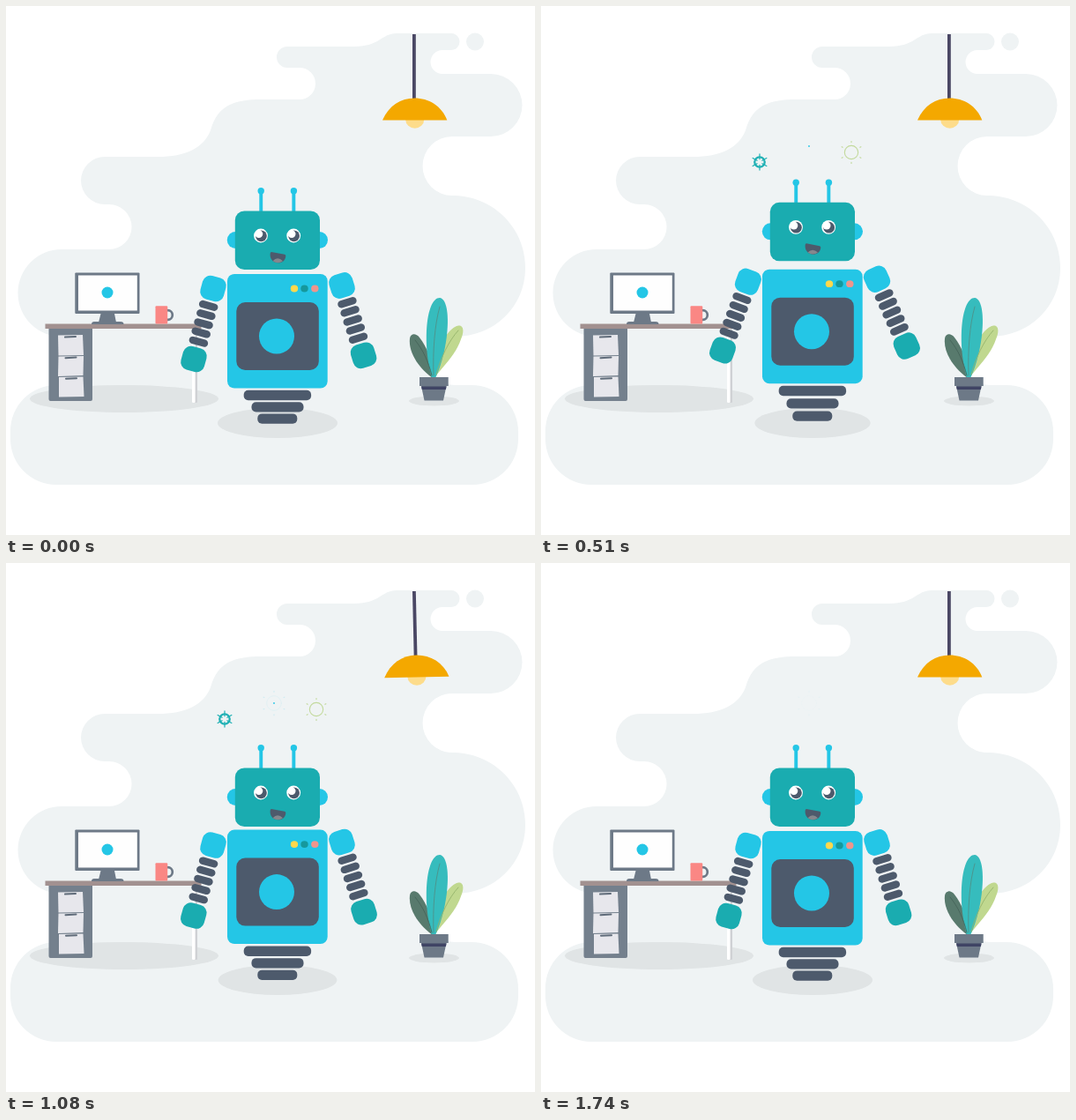
An HTML page that plays this animation: 600x600 px, repeating every 1800 ms.

```html
<!DOCTYPE html>
<html lang="en">
<head>
<meta charset="utf-8">
<title>Hopping robot</title>
<style>
html, body { margin: 0; width: 100%; height: 100%; overflow: hidden; background: #fff; }
svg { display: block; width: 100vw; height: 100vh; }
.cyan { fill: #24c6e6; }
.teal { fill: #1aacb0; }
.dark { fill: #4d5a6c; }
.steel { fill: #6d7987; }
.mist { fill: #eff3f4; }
.shade { fill: #e0e4e5; }
.line { fill: none; stroke-linecap: round; }
</style>
</head>
<body>
<svg viewBox="0 0 600 600">
  <g class="mist">
    <path d="M443 31H505A9.5 9.5 0 0 1 505 50H495A13.5 13.5 0 0 0 495 77H550A35.5 35.5 0 0 1 550 148H506
      A33.5 33.5 0 0 0 506 215C553 215 589 252 589 297C589 341 554 375 509 375A27 27 0 0 0 509 430H528
      A53 53 0 0 1 581 483V491A52 52 0 0 1 529 543H57A52 52 0 0 1 5 491V482A52 52 0 0 1 57 430H66
      A27 27 0 0 0 66 375H63A49.5 49.5 0 0 1 63 276H117A25.5 25.5 0 0 0 117 225H112A27 27 0 0 1 112 171H172
      C204 171 224 161 232 141C239 117 252 106 290 106H333A18 18 0 0 0 333 70H319A12 12 0 0 1 319 46H395
      C424 46 426 31 443 31Z"/>
    <circle cx="532" cy="40.5" r="10"/>
  </g>
  <g class="shade">
    <ellipse cx="134" cy="445.5" rx="107" ry="15.5"/>
    <ellipse cx="485.5" cy="448" rx="28.5" ry="5.5"/>
    <ellipse id="shadow" cx="308" cy="473" rx="68" ry="17"/>
  </g>

  <!-- desk -->
  <rect x="211" y="366" width="6" height="84" rx="1" fill="#cfd1d4"/>
  <rect x="211" y="366" width="3.6" height="84" rx="1" fill="#fff"/>
  <path d="M48.5 366H98V446Q98 448 96 448H50.5Q48.5 448 48.5 446Z" fill="#74808d"/>
  <g fill="#e7e7ec">
    <path d="M59 373.5L87 373L88 396L59.5 396.5Z"/>
    <path d="M59.5 397.5L88 397L87.5 419L59 420Z"/>
    <path d="M60 421L87.5 420.5L88.5 443L60 443.5Z"/>
  </g>
  <path class="line" d="M67 375.6L79 375M67.500 399.200L79.500 398.600M68 422.800L80 422.200" stroke="#5f6b79" stroke-width="2"/>
  <rect x="44.500" y="360.500" width="177" height="5.500" fill="#a29190"/>
  <g class="steel">
    <rect x="78.300" y="302.600" width="73.200" height="46.500" rx="1"/>
    <path d="M107.500 349H123L125 359H105Z"/>
    <path d="M97 361Q97 358 100 358H130Q133.500 358 133.500 361Z"/>
  </g>
  <rect x="82" y="305.500" width="66.800" height="40" fill="#fefefe"/>
  <circle class="cyan" cx="115" cy="325" r="6.500"/>
  <circle class="line" cx="183.500" cy="350.500" r="5.300" stroke="#6d7987" stroke-width="2.700"/>
  <rect x="169.500" y="340.200" width="13.700" height="20.300" rx="1" fill="#fa8784"/>

  <!-- plant -->
  <path d="M484 422C471 413 456 395 458 377C459 371 465 371 469 376C478 388 484 402 484 422Z" fill="#587a6d"/>
  <path d="M486 422C486 396 498 366 513 362.500C519 361.500 520 369 516 378C510 396 496 408 486 422Z" fill="#c0d88f"/>
  <path d="M483 422C472 385 476 331 492 331C506 333 503 388 487 422Z" fill="#36bcbd"/>
  <g class="line" stroke-width=".9">
    <path d="M483 419C479 403 473 390 464 379" stroke="#46655a"/>
    <path d="M485 419C484 392 486 362 492 341" stroke="#4f9189"/>
    <path d="M488 418C493 399 502 380 513 368" stroke="#96b46c"/>
  </g>
  <path class="steel" d="M469 421H501.700V431H499.500L496 447.500H474.500L471 431H469Z"/>
  <path d="M471 431.500H499.600L498.900 435H471.800Z" fill="#3f4464"/>

  <g id="lamp">
    <rect x="461" y="32" width="3.800" height="74" fill="#4a4764"/>
    <ellipse cx="463.700" cy="129" rx="10.500" ry="9.700" fill="#fddc8b"/>
    <path d="M427 129.500C434 113 448 104.500 463.500 104.500C479 104.500 494 113 500.300 129.500Z" fill="#f4a800"/>
  </g>

  <!-- robot -->
  <g class="dark" id="spring">
    <rect x="269.700" y="435.700" width="76.400" height="11.500" rx="5"/>
    <rect x="278.500" y="449.200" width="59" height="11.300" rx="5"/>
    <rect x="285.300" y="462.400" width="45" height="11.300" rx="5"/>
  </g>
  <g id="body">
    <rect class="cyan" x="251" y="304" width="113.700" height="129.500" rx="8"/>
    <ellipse cx="327" cy="320.500" rx="4.200" ry="3.900" fill="#ffd84c"/>
    <ellipse cx="338.500" cy="320.500" rx="4.200" ry="3.900" fill="#16989c"/>
    <ellipse cx="350.300" cy="320.500" rx="4.200" ry="3.900" fill="#f0958c"/>
    <rect class="dark" x="261.300" y="336" width="93.500" height="77" rx="10"/>
    <circle class="cyan" cx="307" cy="374.500" r="20"/>
  </g>
  <g id="left"></g>
  <g id="right"></g>
  <g id="head">
    <g class="cyan">
      <circle cx="260.300" cy="265.500" r="9.500"/>
      <circle cx="355.500" cy="265.500" r="9.500"/>
      <rect x="287.300" y="210" width="3.900" height="24"/>
      <rect x="324.400" y="210" width="3.900" height="24"/>
      <circle cx="289.200" cy="209.800" r="3.700"/>
      <circle cx="326.400" cy="209.800" r="3.700"/>
    </g>
    <rect class="teal" x="259.800" y="232.500" width="96.200" height="66.500" rx="10.500"/>
    <g id="eye">
      <circle cx="289" cy="260.500" r="7.900" fill="#fff"/>
      <circle class="dark" cx="289.400" cy="260.800" r="6.400"/>
      <circle cx="286.800" cy="258.600" r="4.500" fill="#fff"/>
    </g>
    <use href="#eye" x="37.200"/>
    <path class="dark" d="M301 279L316 281.800Q317.500 282 317.300 284C316.500 289 313 291.500 308.500 291.300C302 291 299 286 299.700 280.500Q300 279 301 279Z"/>
    <path d="M302.500 289.200Q308 283.500 314 289.200Q308.500 293.200 302.500 289.200Z" fill="#85878d"/>
  </g>
  <g id="bursts"></g>
</svg>
<script>
const LOOP = 1800, STEP = 30;
const $ = id => document.getElementById(id);
const move = (el, x, y, turn = 0) => el.setAttribute('transform', `translate(${x} ${y}) rotate(${turn})`);

// Each arm hangs straight down from its shoulder at the origin.
const block = (y, cls) => `<rect class="${cls}" x="-13.700" y="${y - 13.7}" width="27.400" height="27.400" rx="9"/>`;
const rings = [0, 1, 2, 3, 4].map(i =>
  `<rect class="dark" x="-11" y="${15.9 + i * 10.6}" width="22" height="8.400" rx="4.200"/>`).join('');
$('left').innerHTML = $('right').innerHTML = rings + block(0, 'cyan') + block(83, 'teal');

// One hop: a smooth rise and fall of width w around time c.
const hop = (t, c, w = 480) => Math.abs(t - c) < w / 2 ? Math.cos(Math.PI * (t - c) / w) ** 2 : 0;
const hops = (t, lag, last) => hop(t, 330 + lag) + hop(t, 810 + lag) + hop(t, 1290 + lag, last);

const sparks = [
  { x: 352, y: 166, start: 300, color: '#b9d48a' },
  { x: 248, y: 177, start: 480, color: '#1fb0b4' },
  { x: 304, y: 159, start: 630, color: '#24c6e6' }
];

function burst({ x, y, color }, t) {
  if (t < -150 || t > 570) return '';
  if (t < 0) return `<circle cx="${x}" cy="${y}" r=".9" fill="${color}"/>`;
  const fade = tau => Math.exp(-t / tau);
  const r = 8.5 * (1 - 0.4 * fade(150)) * Math.min(1, t / 30);
  const inner = 13 * (1 - fade(100)), outer = 14 - 6 * fade(150);
  const alpha = Math.max(0.04, Math.min(1, 1.4 - t / 360));
  let rays = '';
  for (let k = 0; k < 6; k++) {
    const a = Math.PI * (k / 3 + 0.5), c = Math.cos(a), s = Math.sin(a);
    rays += `M${x + inner * c} ${y + inner * s}L${x + outer * c} ${y + outer * s}`;
  }
  return `<g class="line" stroke="${color}" opacity="${alpha}">
    <circle cx="${x}" cy="${y}" r="${r}" stroke-width="${2.6 * fade(250)}"/>
    <path d="${rays}" stroke-width="1.200"/></g>`;
}

function draw(t) {
  const lift = 36.5 * hops(t, 0);
  const arm = hops(t, 13);
  move($('body'), 0, -lift);
  [0.91, 0.75, 0.555].forEach((k, i) => move($('spring').children[i], 0, -lift * k));
  $('shadow').setAttribute('rx', 68 - 0.44 * lift);
  move($('head'), 0, -40.4 * hops(t, 18, 455));
  move($('left'), 235 - 0.5 * arm, 320.5 - 37 * arm, 15.4 + 34.5 * arm ** 1.25);
  move($('right'), 381, 317 - 34.3 * arm, -17.2 - 32 * arm);

  const swing = t > 540 && t < 1740 ? -1.3 * Math.sin(Math.PI * (t - 540) / 120) : 0;
  $('lamp').setAttribute('transform', `rotate(${swing} 463 32)`);

  $('bursts').innerHTML = sparks.map(s => burst(s, t - s.start) + burst(s, t - s.start - 570)).join('');
}

const begin = performance.now();
function tick() {
  const t = (performance.now() - begin) % LOOP;
  draw(Math.min(Math.floor(t / STEP) * STEP, 1740));
  requestAnimationFrame(tick);
}
tick();
</script>
</body>
</html>
```
